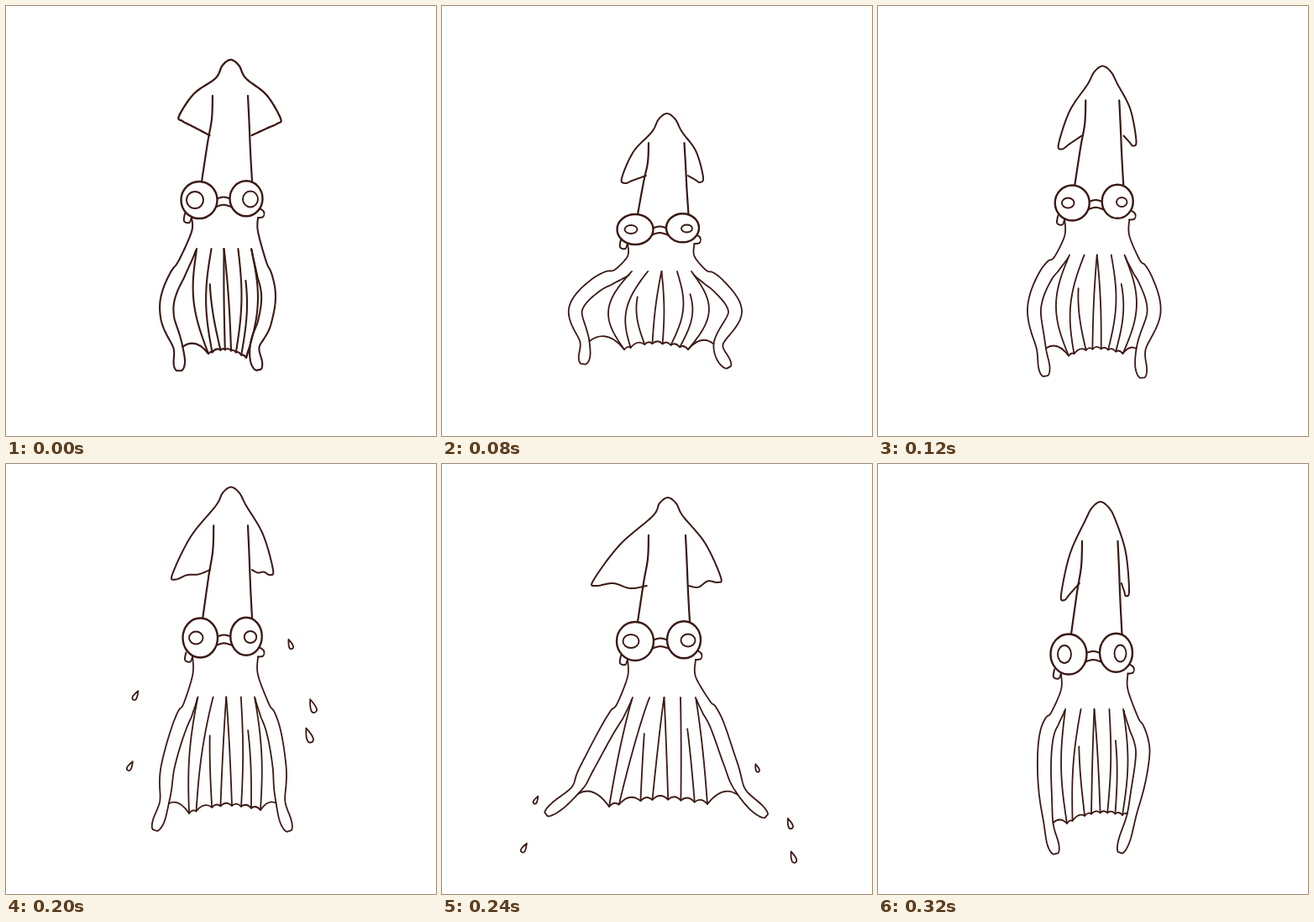
Write an HTML page with a canvas that moves like this. It is 512 px wide and 512 px high and loops after 0.36 s.

```html
<!DOCTYPE html>
<html lang="en">
<head>
<meta charset="utf-8">
<title>Swimming squid</title>
<style>
  html, body { margin: 0; width: 100%; height: 100%; overflow: hidden; background: #fff; }
  canvas { display: block; }
</style>
</head>
<body>
<canvas id="stage" width="512" height="512"></canvas>
<script>
const ctx = document.getElementById("stage").getContext("2d");
const INK = "#3b1914", STEP = 40;

// top: crown y          lens: left centre x, y, radii, distance to the right lens
// finTips: left, right  notch: y where fins meet the mantle, ripple: wave of their lower edge
// root: left x, right x, y of the tentacle row   hem: left x, y, right x, y of its end
// bow: outward bend of the tentacles   arms: spine of each long arm   drops: x, y, half length
const stand = {
  top: 64, lens: [230, 231, 21.5, 22, 56], pupil: [10, 10], ink: 2.1,
  finTips: [[206, 131], [327, 134]], notch: 154, ripple: 0,
  root: [227, 292, 289], hem: [241, 414, 286, 419], bow: 11,
  arms: [[[196, 337], [192, 370], [205, 407], [206, 435]], [[312, 338], [308, 376], [296, 406], [301, 434]]],
  drops: []
};
const crouch = {
  top: 128, lens: [230, 266, 21.5, 18, 56.5], pupil: [7.5, 5], ink: 1.8,
  finTips: [[214, 205], [311, 204]], notch: 202, ripple: 0,
  root: [226, 297, 316], hem: [217, 409, 293, 409], bow: 23,
  arms: [[[185, 331], [159, 361], [170, 400], [168, 427]], [[328, 332], [349, 364], [329, 403], [342, 431]]],
  drops: []
};
const leap = {
  top: 15, lens: [232.5, 203, 19.5, 24, 51.5], pupil: [7, 7], squint: true, ink: 1.8,
  finTips: [[216, 124], [304, 117]], notch: 107, ripple: 0,
  root: [230, 290, 277], hem: [237, 424, 290, 419], bow: 8,
  arms: [[[215, 310], [213, 360], [219, 417], [231, 456]], [[309, 320], [308, 365], [297, 415], [288, 456]]],
  drops: [[197, 151, 7], [198, 262, 6], [302, 67, 7], [316, 148, 10], [303, 178, 11], [236, 48, 6], [214, 77, 4.5]]
};
const spread = {
  top: 40, lens: [230, 211, 22, 23, 58], pupil: [9.5, 8], ink: 1.8,
  finTips: [[180, 139], [332, 135]], notch: 145, ripple: 3,
  root: [227, 302, 278], hem: [199, 408, 316, 405], bow: 1,
  arms: [[[199, 313], [172, 363], [158, 389], [123, 418]], [[325, 305], [343, 355], [357, 391], [387, 420]]],
  drops: [[112, 400, 5], [98, 457, 6], [375, 362, 5], [414, 428, 6.5], [418, 468, 7]]
};
const sink = {
  top: 45, lens: [232, 221, 22.5, 24, 58.5], pupil: [9.5, 10.5], ink: 1.8,
  finTips: [[212, 141], [317, 141]], notch: 153, ripple: 2,
  root: [228, 304, 289], hem: [216, 433, 313, 422], bow: 2,
  arms: [[[197, 333], [186, 385], [181, 428], [160, 467]], [[324, 325], [330, 370], [335, 418], [355, 456]]],
  drops: []
};
const fold = {
  top: 45, lens: [227, 226.5, 21.5, 24, 56.5], pupil: [8, 10.5], ink: 1.8,
  finTips: [[218, 156], [299, 151]], notch: 142, ripple: 0,
  root: [223, 292, 292], hem: [225, 428, 291, 418], bow: 6,
  arms: [[[202, 318], [198, 365], [203, 428], [212, 465]], [[313, 328], [314, 358], [302, 418], [288, 464]]],
  drops: []
};

// tentacle edges: place along the root row, place along the hem, starting depth
const EDGES = [[0, 0, 0], [.27, .1, 0], [.23, .32, .35], [.5, .44, 0], [.5, .6, 0], [.76, .73, 0], [.8, .87, .3], [1, 1, 0]];

const lerp = (a, b, t) => a + (b - a) * t;
const between = (p, q, t) => [lerp(p[0], q[0], t), lerp(p[1], q[1], t)];
const shift = ([x, y], dx, dy) => [x + dx, y + dy];

function mean(a, b) {
  if (typeof a === "number") return (a + b) / 2;
  if (Array.isArray(a)) return a.slice(0, b.length).map((v, i) => mean(v, b[i]));
  const mixed = {};
  for (const key in a) if (key in b) mixed[key] = mean(a[key], b[key]);
  return mixed;
}

// Catmull-Rom through the points, sampled evenly by parameter
function smooth(points, samples = 80) {
  const last = points.length - 1;
  return Array.from({ length: samples + 1 }, (_, n) => {
    const pos = n / samples * last, i = Math.min(Math.floor(pos), last - 1), u = pos - i;
    const a = points[Math.max(i - 1, 0)], b = points[i], c = points[i + 1], d = points[Math.min(i + 2, last)];
    return [0, 1].map(k => b[k] + u / 2 * (c[k] - a[k]
      + u * (2 * a[k] - 5 * b[k] + 4 * c[k] - d[k] + u * (3 * (b[k] - c[k]) + d[k] - a[k]))));
  });
}

function line(points, width) {
  ctx.lineWidth = width;
  ctx.beginPath();
  points.forEach(p => ctx.lineTo(...p));
  ctx.stroke();
}

const curve = (points, width) => line(smooth(points), width);

function oval(x, y, rx, ry, width) {
  ctx.lineWidth = width;
  ctx.beginPath();
  ctx.ellipse(x, y, rx, ry, 0, 0, 2 * Math.PI);
  ctx.fill();
  ctx.stroke();
}

function drawFins({ top, lens, finTips, notch, ripple, ink }) {
  const axis = lens[0] + lens[4] * .67;
  const [left, right] = finTips.map((tip, i) => {
    const side = i ? 1 : -1;
    const shoulder = [axis + side * 18, top + 22], joint = [axis + side * 25, notch];
    const corner = shift(tip, -side * 4, 6);
    return [
      joint,
      shift(between(corner, joint, .67), 0, ripple),
      shift(between(corner, joint, .33), 0, -ripple),
      corner, tip,
      shift(between(shoulder, tip, .5), side * 4, -4),
      shoulder,
      [axis + side * 10, top + 7]
    ];
  });
  line(smooth([...left, [axis, top], ...right.reverse()], 160), ink + .2);
}

// long arm: a tube along its spine, pinched before the club; returns where the web attaches
function drawArm({ lens, root, arms, ink }, i) {
  const side = i ? 1 : -1, samples = 80;
  const spine = smooth([[root[i] + side * 5, root[2]], ...arms[i]], samples);
  const edge = direction => spine.map(([x, y], n) => {
    const v = n / samples, a = spine[Math.max(n - 1, 0)], b = spine[Math.min(n + 1, samples)];
    const tx = b[0] - a[0], ty = b[1] - a[1];
    const cap = Math.sqrt(1 - (Math.max(0, v - .85) / .15) ** 2);
    const pinch = 2 * Math.exp(-(((v - .75) / .1) ** 2));
    const reach = direction * side * Math.min(1, .5 + 3 * v) * (9 - 2 * v - pinch) * cap / Math.hypot(tx, ty);
    return [x + ty * reach, y - tx * reach];
  });
  const outer = edge(1), inner = edge(-1);
  const waistX = i ? lens[0] + lens[4] + 14 : lens[0] - 9, waistY = lens[1] + lens[3] - 1;
  const flank = smooth([[waistX, waistY], [waistX, lerp(waistY, root[2], .45)], outer[8], outer[12]], 30);
  line([...flank, ...outer.slice(13), ...inner.reverse()], ink);
  return inner[samples * .25];
}

function drawTentacles({ root, hem, bow, ink }, webStart, webEnd) {
  const [hemLeft, hemRight] = [hem.slice(0, 2), hem.slice(2)];
  const ends = EDGES.map(([from, to, depth]) => {
    const start = [lerp(root[0], root[1], from), root[2]];
    const end = shift(between(hemLeft, hemRight, to), 0, -7 * Math.sin(Math.PI * to));
    const path = [];
    for (let v = depth; v <= 1.001; v += .025) {
      const bend = bow * (from + to - 1) * Math.sin(Math.PI * v);
      path.push([lerp(start[0], end[0], Math.min(1, v) ** .9) + bend, lerp(start[1], end[1], v)]);
    }
    line(path, ink);
    return end;
  });
  const web = [webStart, ...ends, webEnd];
  ctx.beginPath();
  ctx.moveTo(...webStart);
  for (let i = 1; i < web.length; i++) {
    const [x, y] = between(web[i - 1], web[i], .5);
    ctx.quadraticCurveTo(x, y - Math.abs(web[i][0] - web[i - 1][0]) * .5, ...web[i]);
  }
  ctx.stroke();
}

function drawMantle({ top, lens }) {
  const [x, y, w, h, gap] = lens, neck = top + h * 1.95, end = y - h;
  const right = x + gap;
  curve([[x + 16, neck], [x + 15, lerp(neck, end, .27)], [x + 10, lerp(neck, end, .55)], [x + 3, end]], 2.2);
  curve([[right + 2, neck], [right + 3.5, lerp(neck, end, .3)], [right + 5, lerp(neck, end, .65)], [right + 7, end]], 2.2);
}

function drawGoggles({ lens, pupil, squint }) {
  const [x, y, w, h, gap] = lens, right = x + gap, bottom = y + h;
  curve([[x - 17, bottom - 6], [x - 18, bottom + 3], [x - 12, bottom + 5], [x - 9, bottom - 1]], 2);
  curve([[right + 16, bottom - 12], [right + 21, bottom - 8], [right + 20, bottom - 2], [right + 14, bottom - 1]], 2);
  for (const dy of [0, h * .42])
    curve([[x + w - 2, y - 1 + dy], [x + gap / 2 + 1, y - 3.5 + dy], [right - w + 4, y - 1 + dy]], 2.1);
  oval(x, y, w, h, 2.4);
  oval(right, y - 1.7, w - 2, h - 1, 2.4);
  if (squint) {
    line([[x - 8, y - 13], [x + 2, y - 1], [x - 8, y + 11]], 2.3);
    line([[right + 8, y - 13], [right - 1, y - 1], [right + 6, y + 9]], 2.3);
  } else {
    oval(x - 5, y, ...pupil, 1.9);
    oval(right + 5, y - 1, pupil[0] - 1, pupil[1] - .5, 1.9);
  }
}

function drawDrop([x, y, h], axis) {
  const w = h * .42;
  ctx.save();
  ctx.translate(x, y);
  ctx.rotate(x < axis ? .5 : -.35);
  ctx.beginPath();
  ctx.moveTo(0, -h);
  ctx.bezierCurveTo(w * .6, -h * .4, w * 1.9, h, 0, h);
  ctx.bezierCurveTo(-w * 1.9, h, -w * .6, -h * .4, 0, -h);
  ctx.stroke();
  ctx.restore();
}

function drawSquid(pose) {
  ctx.fillStyle = "#fff";
  ctx.fillRect(0, 0, 512, 512);
  ctx.strokeStyle = INK;
  ctx.lineCap = ctx.lineJoin = "round";
  drawFins(pose);
  drawMantle(pose);
  drawTentacles(pose, drawArm(pose, 0), drawArm(pose, 1));
  pose.drops.forEach(drop => drawDrop(drop, pose.lens[0]));
  drawGoggles(pose);
}

const cycle = [stand, mean(stand, crouch), crouch, mean(crouch, leap), leap, mean(leap, spread), spread, sink, fold];

const start = performance.now();
function tick() {
  drawSquid(cycle[Math.floor((performance.now() - start) / STEP) % cycle.length]);
  requestAnimationFrame(tick);
}
tick();
</script>
</body>
</html>
```
